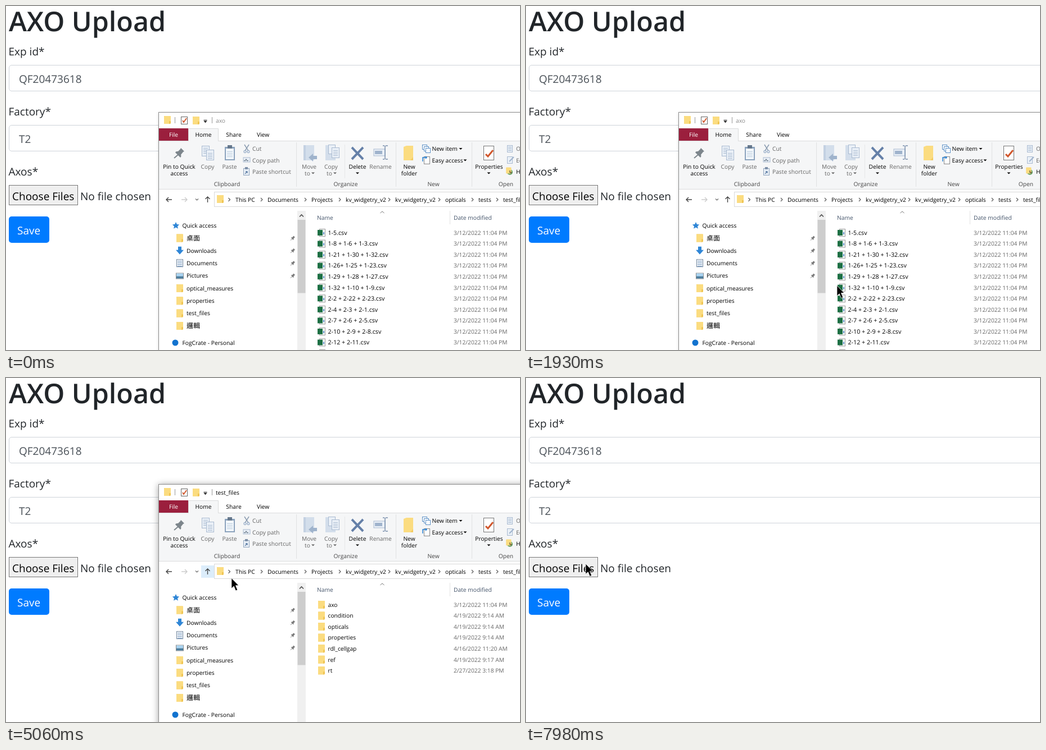
Animation, 914 px wide and 613 px high, one loop 8 s. Source, as an HTML page:

```html
<!DOCTYPE html>
<html lang="en">
<head>
<meta charset="utf-8">
<title>Upload form</title>
<style>
html, body { margin: 0; width: 100%; height: 100%; overflow: hidden; background: #fff; }
svg { display: block; width: 914px; height: 613px; }
text { font-family: "Open Sans", "Noto Sans", "Noto Sans CJK TC", "Noto Sans CJK", sans-serif; text-rendering: geometricPrecision; white-space: pre; }
</style>
</head>
<body>
<svg id="stage" viewBox="0 0 914 613" xmlns="http://www.w3.org/2000/svg"></svg>
<script>
const LOOP = 8000;
const SMALL = 10.25, FILE = 10.7;
const ROW = 19.55;
const INK = '#000', DIM = '#666';

// ---- markup helpers ----
const text = (x, y, s, fill = INK, size = SMALL, more = '') =>
  `<text x="${x}" y="${y}" fill="${fill}" font-size="${size}" ${more}>${s}</text>`;
const label = (x, mid, s, fill, size) => text(x, mid + 3.8, s, fill, size);
const centred = (x, mid, s, fill) => text(x, mid + 3.8, s, fill, SMALL, 'text-anchor="middle"');
const rect = (x, y, w, h, fill, more = '') =>
  `<rect x="${x}" y="${y}" width="${w}" height="${h}" fill="${fill}" ${more}/>`;
const line = (d, stroke, w = 1, fill = 'none') =>
  `<path d="${d}" fill="${fill}" stroke="${stroke}" stroke-width="${w}"/>`;
const shape = (d, fill) => `<path d="${d}" fill="${fill}"/>`;
const group = (id, body, more = '') => `<g id="${id}" ${more}>${body}</g>`;
const at = (x, y, body, k = 1) => `<g transform="translate(${x} ${y}) scale(${k})">${body}</g>`;

// ---- icons, drawn around their centre ----
const folder = (x, y, k = 1) => at(x, y,
  rect(-6, -7, 11, 14, '#f3cb62') + shape('M-5 -7H6V5L4 7H-6V-6Z', '#fbdc80') +
  shape('M3 7V2H6V6L5 7Z', '#f0c555'), k);
const chevron = (x, y, c = '#555') => line(`M${x - 1.5} ${y - 3}l3 3l-3 3`, c, 1.1);
const drop = (x, y, c = INK) => shape(`M${x - 3} ${y - 1.5}h6l-3 3z`, c);
const pin = (x, y, k, c) => at(x, y,
  shape('M3 -9L9 -3L7 -2L3 3C4 6 3 7 2 8L-7 -1C-6 -3 -4 -3 -2 -3L2 -7Z', c) +
  line('M-2 3L-9 9', c, 2), k);
const page = (x, y, w, h, edge, fill = '#fff') =>
  rect(x + .5, y + .5, w, h, fill, `stroke="${edge}"`);
const lines = (x, y, w, n, c) =>
  Array.from({ length: n }, (_, i) => rect(x, y + i * 3, w, 1, c)).join('');
const checkDoc = (x, y, k = 1) => at(x, y,
  page(-6, -7, 11, 13, '#666') + line('M-3 0L-1 3L4 -4', '#d0562c', 1.9), k);
const copies = (c, fill) =>
  page(348, 249, 13, 18, c, fill) + lines(351, 253, 8, 4, c) +
  page(356, 256, 13, 18, c, fill) + lines(359, 262, 8, 4, c);
const sheet = y => page(557, y - 7, 10, 13, '#9a9a9a') + rect(564, y - 1, 2, 4, '#5a8fc8') +
  rect(554, y - 5, 9, 10, '#1d7044');

// Ribbon commands that depend on a selection
function commands(on) {
  const ink = on ? INK : DIM;
  const blue = on ? '#2b82d4' : '#9fb3cc';
  const soft = on ? '#e3f0fb' : '#eaf0f7';
  const edge = on ? '#5b8fc5' : '#a9bad0';
  const gold = on ? '#fbd872' : '#d3deeb';
  const arrow = 'M553 267h-7v-4l-8 7l8 7v-4h7z';
  return copies(edge, soft) + centred(358.5, 286, 'Copy', ink) +
    line('M424 247L431 258M432 247L425 258', on ? '#3c5f87' : '#8798ad', 1.4) +
    `<circle cx="425" cy="259.500" r="2" fill="none" stroke="${blue}" stroke-width="1.300"/>` +
    `<circle cx="431" cy="259.500" r="2" fill="none" stroke="${blue}" stroke-width="1.300"/>` +
    label(438, 254.5, 'Cut', ink) +
    rect(422, 270, 12, 8, soft, `stroke="${edge}"`) + line('M423 275l2 1l2 -3l2 3l2 -1', on ? '#234' : '#678', 1.2) +
    label(438, 275, 'Copy path', ink) +
    rect(529, 248, 19, 27, gold) + shape('M529 248h4v27h-4z', on ? '#f0c24e' : '#c3d1e2') + shape(arrow, blue) +
    centred(539, 286, 'Move', ink) + centred(536, 298, 'to', ink) + drop(546, 298, ink) +
    rect(568, 248, 18, 27, gold) + page(573, 247, 12, 16, edge, soft) + page(579, 252, 13, 18, edge, soft) +
    lines(582, 257, 8, 4, edge) + centred(578, 286, 'Copy', ink) + centred(575, 298, 'to', ink) + drop(585, 298, ink) +
    line('M615 252L635 273M635 252L615 273', on ? '#d8161d' : '#6580a8', 4) +
    centred(625, 286, 'Delete') + drop(625, 298) +
    rect(654, 255, 20, 12, soft, `stroke="${edge}"`) + rect(656, 258, 13, 6, blue) +
    line('M670 249h3m2 0h4M674 249v24M670 273h3m2 0h4', on ? '#444' : '#7990ad', 1.5) +
    centred(666, 286, 'Rename', ink) +
    (on ? folder(896, 254, .95) + rect(893, 255, 7, 5, blue) : page(891, 248, 9, 12, edge, soft) + lines(893, 251, 6, 3, blue)) +
    page(891, 268, 9, 12, edge, soft) + line('M895 277L903 269', blue, 2) +
    `<circle cx="896" cy="296" r="5" fill="#6da56b"/>` + folder(894, 293, .75) + line('M896 293v4h4', '#333') +
    label(907, 254.5, 'Open', ink) + label(907, 275, 'Edit', ink) + label(907, 295.5, 'History');
}

// ---- content ----
const crumbs = [[408, 'This PC'], [465, 'Documents'], [543, 'Projects'], [604, 'kv_widgetry_v2'],
  [692, 'kv_widgetry_v2'], [781, 'opticals'], [840, 'tests'], [884, 'test_files']];
const files = ['1-5', '1-8 + 1-6 + 1-3', '1-21 + 1-30 + 1-32', '1-26+ 1-25 + 1-23', '1-29 + 1-28 + 1-27',
  '1-32 + 1-10 + 1-9', '2-2 + 2-22 + 2-23', '2-4 + 2-3 + 2-1', '2-7 + 2-6 + 2-5', '2-10 + 2-9 + 2-8',
  '2-12 + 2-11', '2-15 + 2-14'];
const folders = [['axo', '3/12/2022 11:04 PM'], ['condition', '4/19/2022 9:14 AM'], ['opticals', '4/19/2022 9:14 AM'],
  ['properties', '4/19/2022 9:14 AM'], ['rdl_cellgap', '4/16/2022 11:20 AM'], ['ref', '4/19/2022 9:17 AM'],
  ['rt', '2/27/2022 3:18 PM']];
const places = ['桌面', 'Downloads', 'Documents', 'Pictures', 'optical_measures', 'properties', 'test_files', '邏輯'];
const rowY = i => 404 + i * ROW;

function form() {
  const big = (x, y, s, fill = '#212529') => text(x, y, s, fill, 19);
  const input = y => rect(5.5, y, 940, 46, '#fff', 'rx="4.5" stroke="#ced4da"');
  return text(5, 45, 'AXO Upload', '#212529', 48.4, 'font-weight="600"') +
    big(4.5, 88, 'Exp id*') + input(105.5) + big(23, 137, 'QF20473618', '#495057') +
    big(4.5, 195, 'Factory*') + input(212.5) + big(23, 244, 'T2', '#495057') +
    big(4.5, 302, 'Axos*') +
    rect(5.5, 319.5, 122, 35, '#efefef', 'stroke="#767676"') + big(11, 346, 'Choose Files', '#000') +
    big(132, 346, 'No file chosen') +
    rect(5, 375, 72, 47, '#007bff', 'rx="5"') + big(20, 407, 'Save', '#fff');
}

function place(name, i) {
  const y = 413.5 + i * 22.35;
  const icon = [
    () => folder(309, y),
    () => shape(`M306 ${y - 7}h6v6h4l-7 8l-7 -8h4z`, '#2f86d6'),
    () => page(303, y - 7, 11, 13, '#6b8199') + lines(305, y - 4, 8, 4, '#5f87b5'),
    () => page(302, y - 5, 13, 10, '#8a8a8a') + rect(303, y - 4, 12, 5, '#a9d4f2') + rect(303, y + 1, 12, 4, '#4a7c9d')
  ][i > 3 ? 0 : i]();
  const cjk = name.charCodeAt(0) > 255;
  return icon + (cjk ? text(321, y + 4, name, INK, 12) : label(321, y, name)) +
    (i < 4 ? pin(510, y, .45, '#7b7b7b') : '');
}

function explorer() {
  const dates = '3/12/2022 11:04 PM';
  const bar = x => rect(x, 243, 1, 79, '#e0e1e2');
  return rect(271.5, 189.5, 700, 500, '#fff', 'id="frame" stroke="#8c8c8c"') +
    // title bar
    folder(287, 203) + rect(300, 198, 1, 11, '#999') + checkDoc(317, 204) + folder(338, 204) +
    rect(351.5, 203, 6, 1, INK) + drop(354.5, 206.5) + rect(366, 198, 1, 11, '#999') +
    group('titleOld', label(373, 204, 'axo', '#8a8a8a')) + group('titleNew', label(373, 204, 'test_files')) +
    // tabs and ribbon
    rect(272, 240, 650, 86, '#f5f6f7') + rect(272, 240, 650, 1, '#dadbdc') + rect(272, 326, 650, 1, '#dadbdc') +
    rect(272, 218, 52, 22, '#9b1f3d') + centred(298, 229.5, 'File', '#fff') +
    line('M324.500 241V218.500H377.500V241', '#dadbdc', 1, '#f5f6f7') +
    centred(351, 229.5, 'Home') + centred(405, 229.5, 'Share') + centred(457, 229.5, 'View') +
    [516, 693, 828].map(bar).join('') + rect(602, 247, 1, 60, '#e6e7e8') +
    pin(308, 262, 1, '#7d868c') + centred(308, 286, 'Pin to Quick') + centred(308, 298, 'access') +
    rect(389, 251, 18, 24, '#8ca3bd') + rect(391, 254, 14, 19, '#f2f7fc') + rect(394, 248, 8, 6, '#66788c') +
    lines(393, 259, 10, 4, '#b9cadb') + centred(397.5, 286, 'Paste', DIM) +
    page(422, 289, 10, 12, '#8fa4bd', '#eaf0f7') + rect(425, 287, 5, 4, '#7d90a8') + line('M425 299l4 -4m-3 0h3v3', '#5d7da5', 1.3) +
    label(438, 295.5, 'Paste shortcut', DIM) +
    group('cmdOff', commands(false)) + group('cmdOn', commands(true)) +
    rect(707, 251, 17, 24, '#f3cb62') + shape('M712 249h12v20l-5 6h-12v-24z', '#fbdc80') +
    centred(717, 286, 'New') + centred(717, 298, 'folder') +
    page(740, 247, 8, 8, '#5b8fc5') + page(743, 250, 8, 8, '#5b8fc5') + page(746, 253, 8, 8, '#5b8fc5') +
    label(757.5, 254.5, 'New item') + drop(808.5, 254.5) +
    page(743, 268, 10, 13, '#888') + line('M741 277v-7h7m-2 -2l2 2l-2 2', '#2b82d4', 1.5) +
    label(757.5, 275, 'Easy access') + drop(816.5, 275) +
    page(849, 249, 18, 25, '#777') + line('M853 264l4 4l9 -11', '#d0562c', 3) +
    centred(859, 286, 'Properties') + drop(858.5, 298) +
    [[393, 'Clipboard'], [604, 'Organize'], [760, 'New'], [889, 'Open']]
      .map(([x, s]) => centred(x, 317, s, '#444')).join('') +
    // address row
    rect(347, 334, 23, 22, '#dcedfb', 'id="upHot"') +
    line('M295 345h-10m4 -4l-4 4l4 4', '#444', 1.4) + line('M312 345h10m-4 -4l4 4l-4 4', '#ccc', 1.4) +
    line('M337 343.500l2.500 2.500l2.500 -2.500', '#666', 1.1) + line('M358.500 350v-10m-4 4l4 -4l4 4', '#444', 1.4) +
    rect(370.5, 331.5, 560, 26, '#fff', 'stroke="#d9d9d9"') + folder(381, 344) +
    rect(0, 332, 0, 26, '#e5f3ff', 'id="crumbHot" stroke="#cce8ff"') + chevron(397, 345) +
    crumbs.map(([x, s], i) => (i ? chevron(x - 10.5, 345) : '') + label(x, 345, s)).join('') +
    // navigation pane
    shape('M302 385l1.900 4l4.300 .500l-3.200 3l.900 4.300l-3.900 -2.200l-3.900 2.200l.900 -4.300l-3.200 -3l4.300 -.500z', '#2f86d6') +
    label(313.5, 391.5, 'Quick access') + places.map(place).join('') +
    '<circle cx="301" cy="600" r="5.500" fill="#1273cf"/>' + label(313.5, 600, 'FogCrate - Personal') +
    group('twisties', line('M278.500 390l3 3l3 -3M280.500 597l3 3l-3 3', '#c4c4c4', 1.1)) +
    rect(518, 365, 15, 250, '#f0f0f0') + line('M522 375.500l3.500 -3.500l3.500 3.500', '#505050', 1.6) + rect(518.5, 381, 14, 130.5, '#cdcdcd') +
    // list
    rect(550, 365, 239, 24, '#d9ebf9', 'id="nameHot"') + rect(789, 365, 130, 24, '#d9ebf9', 'id="dateHot"') +
    label(553, 377, 'Name', '#44546a') + label(796, 377, 'Date modified', '#44546a') +
    rect(789, 365, 1, 24, '#e3e3e3') + line('M665.500 369l3.500 -3l3.500 3', '#777', 1) +
    rect(550, 0, 370, ROW, '#e5f3ff', 'id="rowHot"') +
    rect(550.5, 394.5, 370, 19, '#cce8ff', 'id="picked" stroke="#99d1ff"') +
    group('files', files.map((s, i) => sheet(rowY(i)) + label(572.5, rowY(i), s + '.csv', INK, FILE) + label(796, rowY(i), dates, DIM)).join('')) +
    group('folders', folders.map(([s, d], i) => folder(561, rowY(i)) + label(572.5, rowY(i), s) + label(796, rowY(i), d, DIM)).join('')) +
    group('tip', rect(590.5, 426.5, 298, 45, '#fff', 'stroke="#767676" style="filter:drop-shadow(2px 2px 1.5px rgba(0,0,0,.4))"') +
      ['Date created: 3/12/2022 11:04 PM', 'Size: 161 KB', 'Files: 1-5.csv, 1-8 + 1-6 + 1-3.csv, 1-21 + 1-30 + 1-32.csv, ...']
        .map((s, i) => label(596, 435 + i * 14, s, '#575757')).join(''));
}

const arrow = '<path d="M0 0V18.500L4.300 14.600L7.500 22.500L10.800 21.100L7.600 13.300H13Z" fill="#000" stroke="#fff" stroke-width=".8"/>';
const stage = document.getElementById('stage');
stage.innerHTML = form() + group('win', explorer()) +
  group('ghost', folder(0, 0, 5.6), 'opacity=".5"') + group('cursor', arrow);
const el = {};
stage.querySelectorAll('[id]').forEach(n => el[n.id] = n);

// ---- motion ----
// Pointer tip: time, x, y
const path = [[190, 548, 549], [400, 541, 525], [750, 584, 498], [960, 598, 466], [1100, 594, 500], [1250, 575, 564],
  [1380, 567, 545], [1520, 558, 517], [1590, 545, 440], [1660, 552, 374], [1740, 530, 450], [1800, 538, 514],
  [1950, 570, 480], [2150, 798, 378], [2290, 809, 368], [2360, 809, 368], [2620, 850, 343], [2690, 848, 345],
  [2950, 650, 362], [3190, 455, 348], [3470, 450, 350], [3950, 350, 350], [4140, 350, 350], [4240, 357, 346],
  [4900, 358, 346], [5560, 594, 404], [6420, 594, 404], [6750, 325, 387], [7420, 106, 331]];

function tipAt(t) {
  const i = path.findIndex(p => p[0] > t);
  if (i < 0) return path[path.length - 1].slice(1);
  if (!i) return [-50, -50];
  const [t0, x0, y0] = path[i - 1], [t1, x1, y1] = path[i];
  const k = (t - t0) / (t1 - t0);
  return [x0 + (x1 - x0) * k, y0 + (y1 - y0) * k];
}

const show = (id, on) => { el[id].style.display = on ? '' : 'none'; };

function hover(t, listNew) {
  const [x, y] = tipAt(t);
  const row = Math.floor((y - 394.2) / ROW);
  const inRow = x > 540 && row >= 0 && row < (listNew ? folders.length : files.length);
  show('rowHot', inRow);
  el.rowHot.setAttribute('y', 394.2 + row * ROW);
  const inHead = y > 365 && y < 389 && t < 4000;
  show('nameHot', inHead && x > 550 && x < 789);
  show('dateHot', inHead && x >= 789);
  show('upHot', x > 352 && x < 370 && y < 356);
  const c = crumbs.findIndex(([cx], i) => x >= cx - 4 && x < (crumbs[i + 1] || [950])[0] - 4);
  const inBar = c >= 0 && y > 332 && y < 358 && t < 3320;
  show('crumbHot', inBar);
  if (inBar) {
    const left = crumbs[c][0] - 4;
    el.crumbHot.setAttribute('x', left + .5);
    el.crumbHot.setAttribute('width', (crumbs[c + 1] || [950])[0] - 5 - left);
  }
}

function draw(t) {
  const step = Math.floor((t - 50) / 70) * 70 + 50;
  const [x, y] = tipAt(step);
  const active = t >= 4240, listNew = t >= 4450, picked = t >= 5610;
  const dragging = t >= 6490 && t < 7970;
  el.cursor.setAttribute('transform', `translate(${x} ${y})`);
  el.ghost.setAttribute('transform', `translate(${x} ${y - 45})`);
  show('cursor', t >= 190);
  show('ghost', dragging);
  show('win', t < 7970);
  show('files', !listNew);
  show('folders', listNew);
  show('titleOld', !listNew);
  show('titleNew', listNew);
  show('cmdOff', !picked);
  show('cmdOn', picked);
  show('picked', picked);
  show('tip', t >= 6010 && t < 6480);
  show('twisties', t >= 3540 && t < 4850);
  el.frame.style.filter = `drop-shadow(0 1px ${active ? 6 : 2}px rgba(0,0,0,${active ? .38 : .15}))`;
  hover(step - 140, listNew);
}

function tick() {
  draw(performance.now() % LOOP);
  requestAnimationFrame(tick);
}
tick();
</script>
</body>
</html>
```
